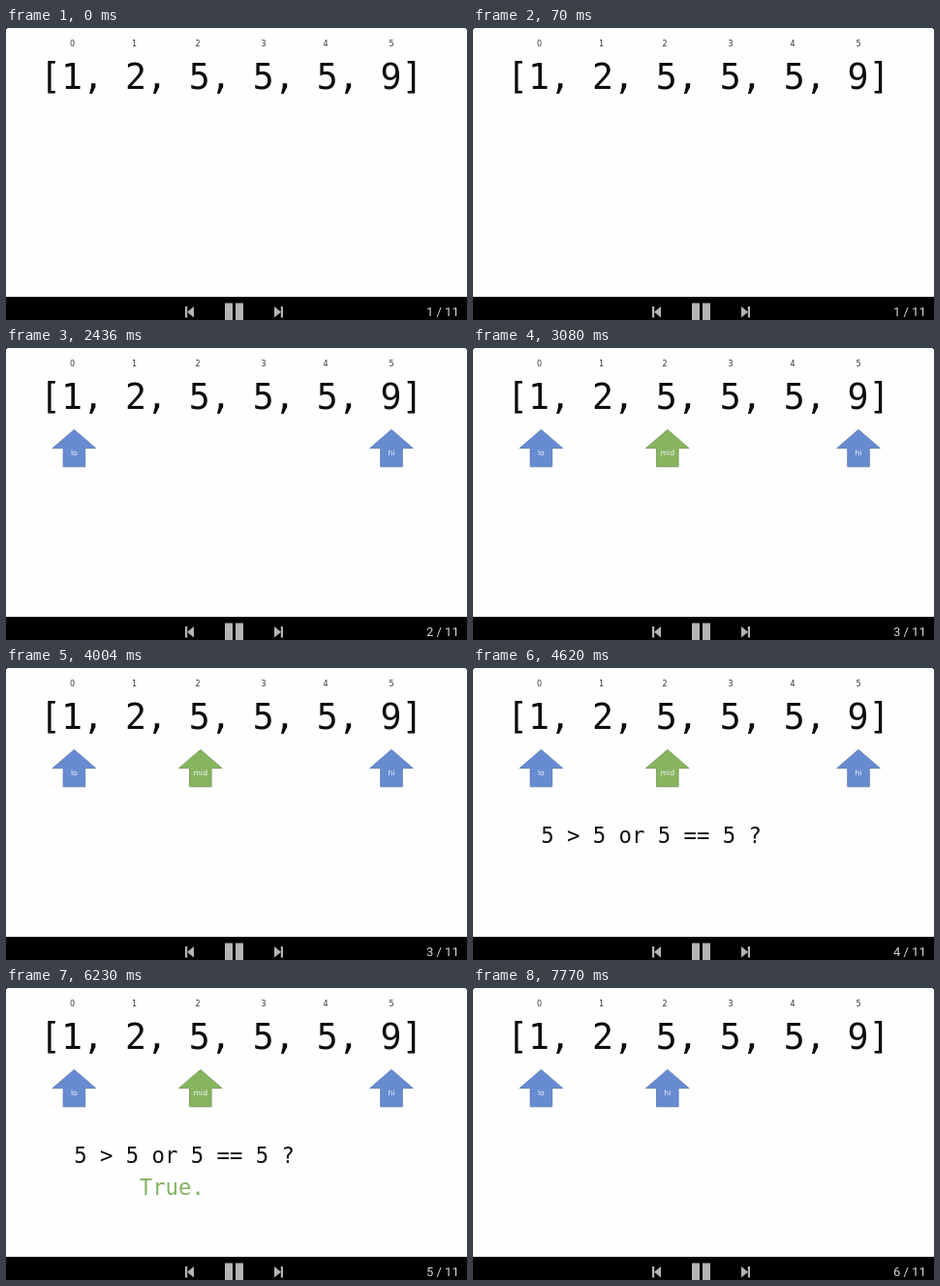
Animation of 476x302 px, one loop 8000 ms. Source, as an HTML page with a canvas:

```html
<!DOCTYPE html>
<html lang="en">
<head>
<meta charset="utf-8">
<title>Binary search slides</title>
<style>
  html, body { margin: 0; width: 100%; height: 100%; overflow: hidden; background: #fff; }
  canvas { display: block; width: 476px; height: 302px; }
</style>
</head>
<body>
<canvas id="stage"></canvas>
<script>
const W = 476, H = 302, LOOP = 8000;
const STARTS = [0, 1470, 3080, 4620, 6230, 7770];
const MONO = '"DejaVu Sans Mono", "Noto Sans Mono", monospace';
const SANS = '"DejaVu Sans", "Noto Sans", sans-serif';
const BLUE = '#668bd0', GREEN = '#87b45f';
const INDEX_X = [68.5, 132.5, 198, 266, 330, 398];

const canvas = document.getElementById('stage');
const ctx = canvas.getContext('2d');
const dpr = window.devicePixelRatio || 1;
canvas.width = W * dpr;
canvas.height = H * dpr;
ctx.scale(dpr, dpr);

function text(str, x, y, size, family, color, align = 'left') {
  ctx.font = `${size}px ${family}`;
  ctx.fillStyle = color;
  ctx.textAlign = align;
  ctx.fillText(str, x, y);
}

function shape(points, color, edge) {
  ctx.beginPath();
  points.forEach(([x, y]) => ctx.lineTo(x, y));
  ctx.closePath();
  ctx.fillStyle = color;
  ctx.fill();
  if (edge) {
    ctx.strokeStyle = edge;
    ctx.lineWidth = 0.8;
    ctx.stroke();
  }
}

function arrow(x, label, color, edge) {
  shape([[x, 84.4], [x + 22.3, 103.7], [x + 11.3, 103.7], [x + 11.3, 122.8],
         [x - 11.3, 122.8], [x - 11.3, 103.7], [x - 22.3, 103.7]], color, edge);
  text(label, x, 110.6, 7.7, SANS, '#f4f7fb', 'center');
}

const blueArrow = (x, label) => arrow(x, label, BLUE, '#5577ae');
const greenArrow = (x, label) => arrow(x, label, GREEN, '#719551');

function skipIcon(x, dir) {
  const grey = '#b4b4b4';
  shape([[x - 4.5 * dir, 288], [x + 2.5 * dir, 293.7], [x - 4.5 * dir, 299.5]], grey);
  ctx.fillRect(x + 3.4 * dir - 1.1, 288, 2.2, 11.5);
}

function controls(page) {
  ctx.fillStyle = '#000';
  ctx.fillRect(0, 278, W, 24);
  skipIcon(189.5, -1);
  skipIcon(281.5, 1);
  ctx.fillStyle = '#b4b4b4';
  ctx.fillRect(226, 284.5, 8, 17.5);
  ctx.fillRect(237, 284.5, 8, 17.5);
  text(`${page} / 11`, 467.7, 298, 13, 'Roboto, "Open Sans", sans-serif', '#d4d4d4', 'right');
}

function corners() {
  ctx.fillStyle = '#000';
  for (const [x, dir] of [[0, 1], [W, -1]]) {
    ctx.beginPath();
    ctx.moveTo(x, 0);
    ctx.lineTo(x + 2.5 * dir, 0);
    ctx.quadraticCurveTo(x, 0, x, 2.5);
    ctx.fill();
  }
}

function draw(page) {
  ctx.fillStyle = '#fefefe';
  ctx.fillRect(0, 0, W, H);
  corners();

  INDEX_X.forEach((x, i) => text(i, x, 19, 8, SANS, '#333', 'center'));
  text('[1, 2, 5, 5, 5, 9]', 35, 63, 36.5, MONO, '#0c0c0c');

  if (page > 1) blueArrow(70.4, 'lo');
  if (page > 1 && page < 6) blueArrow(398, 'hi');
  if (page > 2 && page < 6) greenArrow(200.8, 'mid');
  if (page === 4 || page === 5) text('5 > 5 or 5 == 5 ?', 70.2, 180.5, 22.25, MONO, '#111');
  if (page === 5) text('True.', 137.8, 214, 22.25, MONO, '#86b163');
  if (page === 6) blueArrow(200.8, 'hi');

  controls(page);
}

let start = null;
function tick(now) {
  if (start === null) start = now;
  const t = (now - start) % LOOP;
  draw(STARTS.filter(s => s <= t).length);
  requestAnimationFrame(tick);
}
draw(1);
requestAnimationFrame(tick);
</script>
</body>
</html>
```
